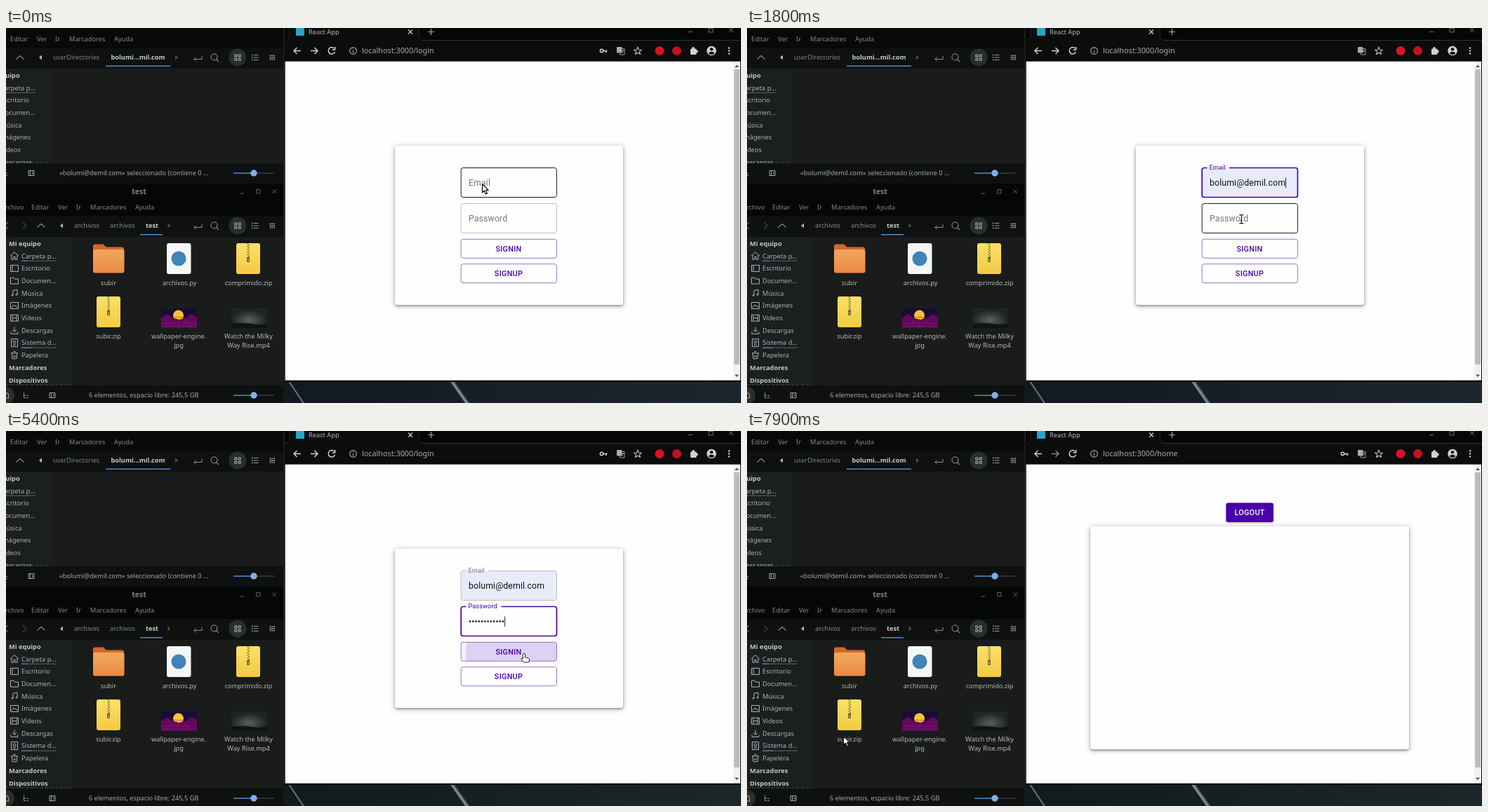
Write an HTML page that moves like this. It is 1047 px wide and 535 px high and loops after 8000 ms.

```html
<!DOCTYPE html>
<html lang="es">
<head>
<meta charset="utf-8">
<title>Login demo</title>
<style>
html, body { margin: 0; width: 100%; height: 100%; overflow: hidden; background: #000; }
svg { display: block; width: 100%; height: 100%; font: 9.24px "Noto Sans", sans-serif; }
text { white-space: pre; }
.web { font-family: Roboto, sans-serif; letter-spacing: .00938em; }
.btn { font: 500 10.8px Roboto, sans-serif; letter-spacing: .02857em; }
.card { filter: drop-shadow(0 2px 1.5px rgba(0,0,0,.25)) drop-shadow(0 1.5px 3.5px rgba(0,0,0,.3)); }
.raised { filter: drop-shadow(0 1px 1px rgba(0,0,0,.3)); }
</style>
</head>
<body>
<svg viewBox="0 0 1047 535">
  <defs>
    <linearGradient id="folder" x2="0" y2="1"><stop stop-color="#f3a75f"/><stop offset="1" stop-color="#e98a45"/></linearGradient>
    <linearGradient id="zip" x2="0" y2="1"><stop stop-color="#fce069"/><stop offset="1" stop-color="#f1cb42"/></linearGradient>
    <radialGradient id="night" cy=".6"><stop stop-color="#5b6158"/><stop offset="1" stop-color="#1d2527"/></radialGradient>
    <linearGradient id="desk"><stop stop-color="#101a1f"/><stop offset="1" stop-color="#1c272c"/></linearGradient>
  </defs>
  <g id="back"></g>
  <g id="live"></g>
</svg>
<script>
const LOOP = 8000, PURPLE = '#4a00a8', BLUE = '#4a86c5';
const USER = 'bolumi@demil.com';
const byId = id => document.getElementById(id);
const rect = (x, y, w, h, fill, r = 0, more = '') =>
  `<rect x="${x}" y="${y}" width="${w}" height="${h}" rx="${r}" fill="${fill}" ${more}/>`;
const circle = (x, y, r, fill, more = '') => `<circle cx="${x}" cy="${y}" r="${r}" fill="${fill}" ${more}/>`;
const line = (d, color = '#a5a8a8', w = 1.2, fill = 'none') =>
  `<path d="${d}" fill="${fill}" stroke="${color}" stroke-width="${w}" stroke-linejoin="round"/>`;
const shape = (d, fill) => `<path d="${d}" fill="${fill}"/>`;
// y is the middle of the capitals
const text = (x, y, s, fill = '#9da0a0', more = '', size = 9.24) =>
  `<text x="${x}" y="${y + size * .36}" fill="${fill}" font-size="${size}" ${more}>${s}</text>`;
const group = (x, y, s) => `<g transform="translate(${x} ${y})">${s}</g>`;
const BOLD = 'font-weight="600"', MID = 'text-anchor="middle"', HEAD = `${BOLD} ${MID}`;

/* ---- file manager ---- */
const PLACES = ['Mi equipo', 'Carpeta p...', 'Escritorio', 'Documen...', 'Música', 'Imágenes', 'Vídeos',
  'Descargas', 'Sistema d...', 'Papelera', 'Marcadores', 'Dispositivos'];
const PLACE_ICONS = {
  1: 'M-6 0L0-5.5 6 0M-4-1V5H-1V1H1V5H4V-1',
  2: 'M-5.5-4.5H5.5V4.5H-5.5ZM-3-4V4',
  3: 'M-5.5 4.5V-4.5H-1L0-2.5H5.5V4.5Z',
  4: 'M-2 3V-4L4-5V2M-4 3a1 1 0 1 0 2 0a1 1 0 1 0-2 0M2 2a1 1 0 1 0 2 0a1 1 0 1 0-2 0',
  5: 'M-5.5-4.5H5.5V4.5H-5.5ZM-4 3L-1-1 1 1 2 0 4 3',
  6: 'M-5.5-4.5H5.5V4.5H-5.5ZM-3-4V4M3-4V4M-3 0H3',
  7: 'M0-5V2M-3-1L0 2 3-1M-5 2V5H5V2',
  8: 'M-4.5-5.5H4.5V5.5H-4.5ZM-2-1a2 2 0 1 0 4 0a2 2 0 1 0-4 0M-2 3H2',
  9: 'M-5-3H5M-4-3L-3 5H3L4-3M-2-5H2M-1 0V3M1 0V3'
};

function sidebar() {
  let s = rect(-2, 298, 95, 214, '#1c1f1f');
  PLACES.forEach((name, i) => {
    const y = 307.5 + i * 17.7, head = !PLACE_ICONS[i];
    if (!head) s += group(12, y, line(PLACE_ICONS[i], '#b0b3b3', 1));
    s += text(head ? 4 : 22, y, name, head ? '#c4c7c7' : '#aeb1b1', head ? BOLD : '');
    if (i == 1 || i == 8)
      s += rect(22, y + 6.5, 50, 1.2, '#55595a') + rect(22, y + 6.5, i == 1 ? 9 : 15, 1.2, BLUE);
  });
  return s;
}

const menu = () => [[-7, 'Archivo'], [36, 'Editar'], [74, 'Ver'], [100, 'Ir'], [120, 'Marcadores'], [184, 'Ayuda']]
  .map(([x, s]) => text(x, 256, s, '#85898a')).join('');

const tools = y => group(0, y,
  line('M279-2V2.5H268M271-.5L268 2.5 271 5.5', '#8d9091', 1) +
  circle(296.5, -.5, 4.5, 'none', 'stroke="#8d9091" stroke-width="1.1"') + line('M299.8 2.8L303 6', '#8d9091', 1.1) +
  circle(330, 0, 12.5, '#292d2d') +
  [325.8, 331.2].map(x => [-4, 1.2].map(v => line(`M${x} ${v}h3v3h-3Z`, '#b5b8b8', 1)).join('')).join('') +
  [-3.5, 0, 3.5].map(v => rect(350, v - .8, 1.6, 1.6, '#989b9b') + rect(353, v - .5, 6.5, 1, '#989b9b') +
    [375.7, 378.4, 381.1].map(x => rect(x, v * .77 - .9, 1.8, 1.8, '#989b9b')).join('')).join(''));

const status = (y, h, shift, s) => rect(0, y, 395, h, '#0f1111') +
  line(`M0 ${y - 1}H${93 + shift}`, '#4a4e4e', .8).replace('/>', ' stroke-dasharray="4 3"/>') +
  group(shift, y + 14, circle(0, 0, 12, '#292d2d') + line('M-3-3H3L4 4H-4Z', '#a5a8a8', 1) +
    line('M25.5-4V3.5H28M25.5 0H28M29 .5H32M29 3.5H32', '#8d9091', 1) +
    line('M62-3.5H70V3.5H62ZM64.5-3.5V3.5M69-1.5L67 0 69 1.5', '#a5a8a8', 1)) +
  s + rect(324, y + 13.3, 29, 1.6, BLUE) + rect(353, y + 13.3, 29, 1.6, '#34393a') + circle(353, y + 14, 4.7, '#7fb0e8');

const tri = (x, y, dir, color) => shape(`M${x} ${y - 3.5}v7l${4 * dir}-3.5z`, color);
const chevUp = (x, y) => line(`M${x - 5.5} ${y + 2.5}L${x} ${y - 2.5} ${x + 5.5} ${y + 2.5}`, '#85898a', 1.1);
const label = (x, y, s) => text(x, y, s, '#b4b7b7', MID);

function zipFile(x, y) {
  let s = rect(x, y, 34, 44, 'url(#zip)', 3);
  for (let i = 0; i < 10; i++) s += rect(x + 15.5 + i % 2 * 1.6, y + i * 2, 1.8, 1.4, '#75652a');
  return s + rect(x + 15, y + 19.5, 4, 7.5, '#6f6030', 1) + rect(x + 16.3, y + 22.5, 1.4, 3, '#e0c24a');
}

function files() {
  let s = shape('M124 340V311.5a3 3 0 0 1 3-3H138.5L142.5 312.5H165a3 3 0 0 1 3 3V340Z', '#d5672c') +
    rect(124, 316, 44.5, 33.5, 'url(#folder)', 3);
  s += rect(229, 307, 34.5, 44, '#f5f6f6', 3) + circle(246, 329, 10.5, '#4083b8');
  s += zipFile(328, 307) + zipFile(129, 383);
  s += rect(221, 400, 51, 28, '#1a0b36') + circle(245.5, 410, 7.5, '#f8c52f') + rect(238, 412, 15, 1.2, '#e0603f') +
    shape('M221 413L230 408 238 414 247 416 257 413 264 408 272 412V428H221Z', '#5f0a5c') +
    line('M221 421H272M221 425H272M246 417V428M238 417L228 428M254 417L264 428', '#9c1583', .6);
  s += rect(321, 400, 50.5, 28, 'url(#night)', 1) + shape('M321 422Q340 420 350 422T371.5 422V428H321Z', '#101312');
  return s + label(146, 364, 'subir') + label(247, 364, 'archivos.py') + label(345.5, 364, 'comprimido.zip') +
    label(146, 439.5, 'subir.zip') + label(246, 439.5, 'wallpaper-engine.') + label(246, 453, 'jpg') +
    label(345.5, 439.5, 'Watch the Milky') + label(345.5, 453, 'Way Rise.mp4');
}

function managers() {
  return rect(0, 0, 395, 222, '#080909') + rect(0, 29, 395, 29, '#0f1111') + rect(0, 58, 395, 136, '#191c1b') +
    group(-30, -240, menu() + sidebar()) +
    chevUp(20, 42) + tri(51, 42, -1, '#b5b8b8') + text(67, 42, 'userDirectories', '#7d8182') +
    text(188, 42, 'bolumi...mil.com', '#c8cbcb', HEAD) + rect(142, 53.5, 92, 1.6, BLUE) +
    tri(241, 42, 1, '#4b4f50') + tools(42) +
    status(193, 29, -30, text(76, 207, `«${USER}» seleccionado (contiene 0 ...`, '#a5a8a8')) +

    rect(0, 222, 395, 46, '#050606') + rect(0, 268, 395, 30, '#0f1111') + rect(0, 298, 395, 214, '#191c1b') +
    text(189.5, 233, 'test', '#7d8183', HEAD, 10.6) +
    line('M333.5 236H339M356.5 230.5H362V236H356.5ZM379.5 230.5L385 236M385 230.5L379.5 236', '#5f6364', 1) +
    menu() + sidebar() + line('M3 277L-2 282 3 287', '#6d7172') + line('M24 277L29 282 24 287', '#3e4242') +
    chevUp(50, 282) + tri(81, 282, -1, '#b5b8b8') +
    text(97, 282, 'archivos', '#85898a') + text(148, 282, 'archivos', '#85898a') +
    text(208, 282, 'test', '#c8cbcb', HEAD) + rect(191, 294, 32, 1.6, BLUE) +
    tri(230.5, 282, 1, '#4b4f50') + tools(282) + files() +
    status(510, 25, 0, text(118, 524, '6 elementos, espacio libre: 245,5 GB', '#a5a8a8'));
}

/* ---- browser frame ---- */
const LIGHT = '#d0d2d3';
function browser() {
  let s = rect(395, 0, 652, 535, 'url(#desk)') + line('M403 504L425 537', '#66757a', 2) +
    line('M635 504L658 537', '#79868a', 4) + line('M638 504L661 537', '#3a4a50', 1.5);
  s += rect(395, 0, 652, 505, '#050606') + rect(395.5, 0, 1.2, 505, '#2c2f30') +
    rect(398, 18, 649, 30, '#0b0c0c') + line('M398 17.5Q404 17.5 404 12V0M588 0V12Q588 17.5 594 17.5H1047', '#3a3d3f', .8) +
    rect(404.5, 0, 183, 18, '#0b0c0c');
  s += rect(413, 0, 12, 11, '#27a5c4', 1) + text(431, 5.5, 'React App', '#b5b8b9') +
    line('M573 2.5L579 8.5M579 2.5L573 8.5', LIGHT, 1.2) + line('M601 5.5H610M605.5 1V10', '#a5a8a9', 1.2) +
    line('M972 5.5H978M1001 .5H1007V6H1001ZM1030 0L1036 6M1036 0L1030 6', '#6d7172', 1);
  s += line('M420 32.5H410M414.5 28L410 32.5 414.5 37', LIGHT, 1.5) +
    line('M467.5 29A4.8 4.8 0 1 0 468.5 34M468.7 27V31H464.7', LIGHT, 1.5) +
    circle(494.5, 32.5, 4.9, 'none', 'stroke="#a5a8a9" stroke-width="1.1"') + line('M494.5 32V35.5M494.5 29.5V30.7', '#a5a8a9', 1.2) +
    rect(870, 27, 7.5, 8.5, '#a9adae', 1) + line('M874.5 35.5V38H881V29.5H877.5M878 32H880.5M879 32Q879 34 877.5 35.5', '#a9adae', .9) +
    line('M900 27L901.5 31 905.5 31.2 902.3 33.6 903.5 37.5 900 35.2 896.5 37.5 897.7 33.6 894.5 31.2 898.5 31Z', '#bfc2c3', 1.1) +
    circle(931, 32.5, 6.5, '#d8151f') + circle(955.5, 32.5, 6.5, '#c4121c') +
    rect(975, 29.5, 8.5, 8.5, LIGHT, 1) + circle(979, 29, 1.9, LIGHT) + circle(983.8, 33.5, 1.9, LIGHT) +
    circle(1005, 32.5, 6.8, LIGHT) + circle(1005, 30.3, 2.2, '#0b0c0c') + shape('M1000.5 36Q1005 31.5 1009.5 36Q1005 40 1000.5 36', '#0b0c0c') +
    [28.5, 32.5, 36.5].map(y => circle(1030, y, 1.2, LIGHT)).join('');
  return s + rect(397.7, 47.7, 638.3, 455, '#fefefe') + rect(1036, 47.7, 10, 455, '#f1f1f1') + rect(1037, 59, 8, 421, '#bcbcbc') +
    shape('M1038 56h6l-3-3.5zM1038 494.5h6l-3 3.5z', '#555');
}

/* ---- changing part ---- */
const pen = document.createElement('canvas').getContext('2d');
const webWidth = s => (pen.font = '12.3px Roboto, sans-serif', pen.measureText(s).width + s.length * .115);
const web = (x, y, s, fill, size = 12.3) => text(x, y, s, fill, 'class="web"', size);
const clamp = v => Math.max(0, Math.min(1, v));
const rise = (t, from, ms = 200) => 1 - (1 - clamp((t - from) / ms)) ** 3;

function field(y, name, notch, { focus, hover, fill, lift, value, caret }) {
  const left = 655.5, n = lift > 0 || focus ? notch : left;
  let s = rect(648, y + .5, 136.5, 42.5, fill || '#fefefe', 3);
  s += line(`M${n} ${y + .5}H781.4a3 3 0 0 1 3 3v36a3 3 0 0 1-3 3H651.2a3 3 0 0 1-3-3V${y + 3.5}a3 3 0 0 1 3-3H${left}`,
    focus ? PURPLE : hover ? '#1a1a1a' : '#bdbdbd', focus ? 1.7 : 1);
  s += web(659 - .6 * lift, y + 21.6 - 21.8 * lift, name, focus ? PURPLE : '#757575', 12.3 - 3.06 * lift);
  s += web(659, y + 21.6, value, '#111');
  if (caret) s += rect(659 + webWidth(value), y + 14.5, .9, 14.5, '#111');
  return s;
}

const button = (y, s, fill = '#fefefe') => rect(648.2, y, 136.2, 27, fill, 3, 'stroke="#9070c4" stroke-width=".95"') +
  `<text class="btn" x="716" y="${y + 17.4}" text-anchor="middle" fill="${PURPLE}">${s}</text>`;

function suggestions(t) {
  const out = clamp((t - 1500) / 200), k = 1 - .03 * out;
  let s = rect(648, 243.5, 157, 95, '#101112', 2, 'class="raised"');
  if (t >= 1200) s += rect(648, 249.5, 157, 27.5, '#242627');
  [USER, 'bolumimelto@dotamil.com', 'bolumimelto@demil.com'].forEach((name, i) =>
    s += text(657, 263 + i * 27.6, name, '#9b9d9e', '', 9.75));
  return `<g opacity="${clamp((t - 500) / 200) * (1 - .84 * out)}" transform="translate(726 291) scale(${k}) translate(-726 -291)">${s}</g>`;
}

// moments at which a password character arrives
const KEYS = [2400, 2600, 2700, 2800, 3100, 3400, 3600, 3800, 3900, 4100, 4400, 4400];

function login(t) {
  const second = t >= 1900, filled = t >= 1300, typed = KEYS.filter(k => t >= k).length;
  let s = rect(554, 168, 325, 227, '#fefefe', 3, 'class="card"');
  s += field(199, 'Email', 687, {
    focus: t >= 400 && !second, hover: t < 400, fill: filled && '#e8ebfa', lift: rise(t, 400),
    value: filled ? USER : '', caret: t >= 400 && !second && (!filled || t >= 1500)
  });
  s += field(250, 'Password', 705.5, {
    focus: second, hover: t >= 1600 && !second, lift: rise(t, 1900), value: '•'.repeat(typed), caret: second
  });
  s += button(301.3, 'SIGNIN', t >= 5200 ? '#f5f0fb' : '#fefefe');
  if (t >= 5300 && t < 5600) {
    const r = 95 * rise(t, 5200, 400);
    s += `<clipPath id="edge">${rect(648, 301.3, 136.5, 27, '#000', 3)}</clipPath>` +
      circle(738, 318, r, PURPLE, `opacity="${.13 * clamp((5600 - t) / 200)}" clip-path="url(#edge)"`);
  }
  s += button(336.7, 'SIGNUP');
  return s + (t >= 600 && t < 1700 ? suggestions(t) : '');
}

const home = () => rect(682.4, 102.4, 67.5, 27.5, PURPLE, 3, 'class="raised"') +
  '<text class="btn" x="716" y="120" text-anchor="middle" fill="#fff">LOGOUT</text>' +
  rect(489, 136, 454, 318, '#fefefe', 3, 'class="card"');

// time, x, y of the pointer's hot spot
const PATH = [[0, 678, 222], [300, 678, 222], [800, 690, 238], [1000, 690, 238], [1100, 691, 240], [1600, 703, 268],
  [1900, 705, 275], [4800, 705, 275], [5300, 738, 318], [6100, 738, 318], [6200, 533, 319], [6300, 392, 300],
  [6400, 290, 284], [6500, 267, 289], [6600, 283, 315], [6800, 335, 345], [7300, 335, 345], [7500, 345, 341],
  [7600, 345, 341], [7700, 275, 376], [7800, 180, 424], [7900, 137, 435], [8000, 137, 435]];
const ARROW = line('M.5.5V12.8L3.3 10.2 5.4 14.9 7.5 14 5.4 9.4H9.2Z', '#111', 1.2, '#fff');
const BEAM = ['#fff', '#111'].map((c, i) =>
  line('M-3-6H-1Q0-6 0-5Q0-6 1-6H3M0-5V5M-3 6H-1Q0 6 0 5Q0 6 1 6H3M-1.5 2H1.5', c, i ? 1.1 : 2.4)).join('');
const HAND = line('M-1.5 6V0Q0-2 1.5 0V5L6 6Q8 6.5 7.5 9L6.5 12H-.5L-4 7.5Q-4.5 5.5-1.5 7Z', '#111', .9, '#fff');

function pointer(t) {
  const i = PATH.findIndex(p => p[0] > t), [t0, x0, y0] = PATH[i - 1], [t1, x1, y1] = PATH[i];
  const k = (t - t0) / (t1 - t0);
  const look = t >= 5200 && t < 5700 ? HAND
    : t >= 400 && t < 1200 || t >= 1600 && t < 5200 ? BEAM : ARROW;
  return group(x0 + (x1 - x0) * k, y0 + (y1 - y0) * k, look);
}

function scene(t) {
  const moved = t >= 5500;
  let s = text(507, 32.5, `localhost:3000/${moved ? 'home' : 'login'}`, '#a9acad', '', 10.8);
  s += line('M434 32.5H444M439.5 28L444 32.5 439.5 37', moved ? '#858889' : LIGHT, 1.5);
  if (t < 1500 || t >= 2400)
    s += circle(848.5, 32.5, 2.2, 'none', `stroke="${LIGHT}" stroke-width="1.5"`) + line('M851 32.5H856.5M854.8 32.5V35', LIGHT, 1.6);
  return s + (t < 5700 ? login(t) : home()) + pointer(t);
}

byId('back').innerHTML = browser() + managers();
const start = performance.now();
let shown = -1;
function tick() {
  const t = Math.floor((performance.now() - start) % LOOP / 100) * 100;
  if (t !== shown) byId('live').innerHTML = scene(shown = t);
  requestAnimationFrame(tick);
}
tick();
</script>
</body>
</html>
```
